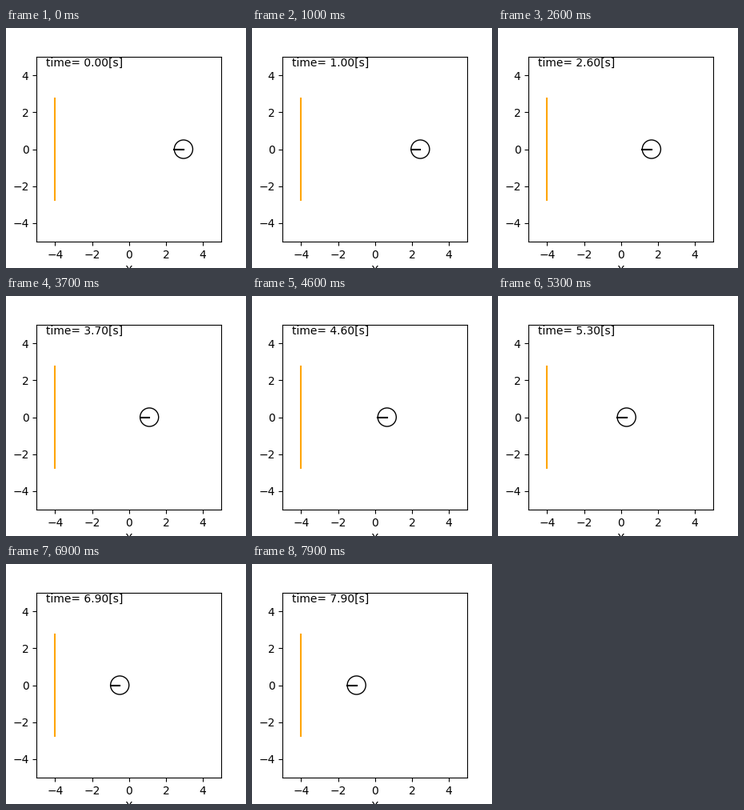
A matplotlib script that plays this animation: 300x300 px, repeating every 8000 ms.

```python
import matplotlib.pyplot as plt
from matplotlib.animation import FuncAnimation

DT = 0.1        # seconds per step
STEPS = 80
RADIUS = 0.5
START = 2.95
SPEED = -0.5    # units per second

plt.rcParams["font.family"] = "DejaVu Sans"
fig = plt.figure(figsize=(3, 3), dpi=100)
ax = fig.add_subplot(111)
ax.set_aspect("equal")
ax.set_xlim(-5, 5)
ax.set_ylim(-5, 5)
ax.set_xticks(range(-4, 5, 2))
ax.set_yticks(range(-4, 5, 2))
ax.set_xlabel("X", fontsize=10)

ax.plot([-4, -4], [-2.75, 2.75], color="orange", lw=1.5)
body = ax.add_patch(plt.Circle((START, 0), RADIUS, fill=False, ec="black", lw=1))
nose, = ax.plot([], [], color="black", lw=1.5)
clock = ax.text(-4.5, 4.5, "", fontsize=10)


def update(step):
    t = step * DT
    x = START + SPEED * t
    body.center = (x, 0)
    nose.set_data([x, x - RADIUS], [0, 0])
    clock.set_text(f"time= {t:.2f}[s]")
    return body, nose, clock


anim = FuncAnimation(fig, update, frames=STEPS, interval=1000 * DT,
                     repeat=True, repeat_delay=0)
plt.show()
```
